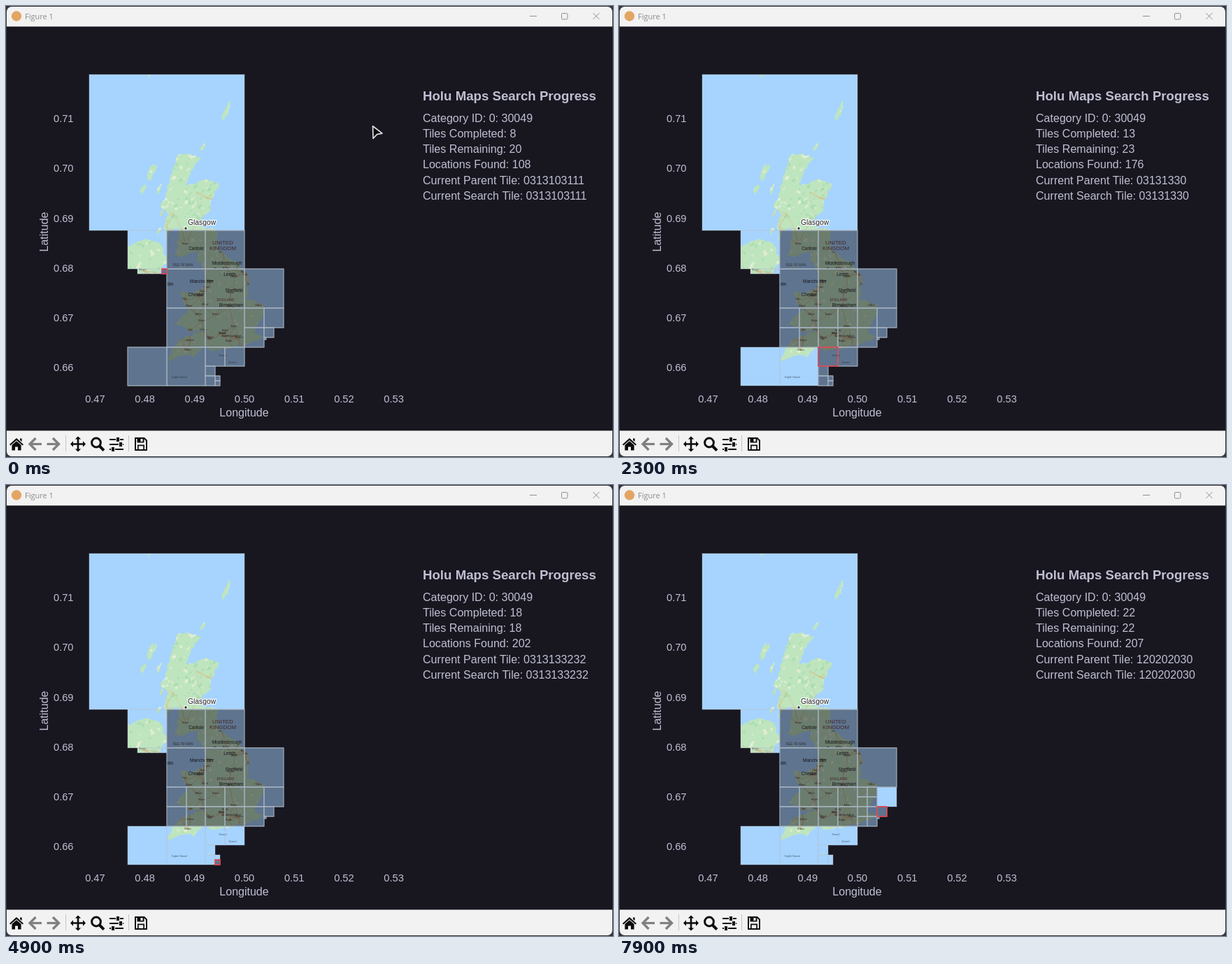
Recreate the animation shown at these times as an HTML page with a canvas. Size 868 by 645 pixels, loop 8000 ms.

```html
<!DOCTYPE html>
<html lang="en">
<head>
<meta charset="utf-8">
<title>Figure 1</title>
<style>
html, body { margin: 0; width: 100%; height: 100%; overflow: hidden; background: #181720; }
canvas { display: block; width: 868px; height: 645px; }
</style>
</head>
<body>
<canvas id="stage" width="868" height="645"></canvas>
<script>
const W = 868, H = 645, LOOP = 8000, UNIT = 7120;
const SANS = '"Liberation Sans", Arial, sans-serif';
const INK = '#bfbfd2', DARK = '#181720';
const stage = document.getElementById('stage').getContext('2d');

// Normalised Mercator square (0..1) to stage pixels
const px = u => 341 + (u - 0.5) * UNIT;
const py = v => 543.2 + (v - 0.34375) * UNIT;
const lonX = lon => px(0.5 + lon / 360);
const latY = lat =>
  py(0.5 - Math.log(Math.tan(Math.PI / 4 + lat * Math.PI / 360)) / (2 * Math.PI));

// Quadkey to pixel box [x, y, w, h], snapped to whole pixels
function tileBox(key) {
  let x = 0, y = 0;
  for (const d of key) { x = x * 2 + (d & 1); y = y * 2 + (d >> 1); }
  const n = 2 ** key.length;
  const l = Math.round(px(x / n)), t = Math.round(py(y / n));
  return [l, t, Math.round(px((x + 1) / n)) - l, Math.round(py((y + 1) / n)) - t];
}

function layer() {
  const c = document.createElement('canvas');
  c.width = W; c.height = H;
  return c;
}

function text(g, s, x, y, size, { color = INK, align = 'left', weight = '', font = SANS } = {}) {
  g.font = `${weight} ${size}px ${font}`;
  g.fillStyle = color;
  g.textAlign = align;
  g.fillText(s, x, y);
}

function line(g, color, width, ...pts) {
  g.strokeStyle = color;
  g.lineWidth = width;
  g.beginPath();
  for (let i = 0; i < pts.length; i += 2) g.lineTo(pts[i], pts[i + 1]);
  g.stroke();
}

function blob(g, x, y, rx, ry, turn) {
  g.beginPath();
  g.ellipse(x, y, rx, ry, turn, 0, 7);
  g.fill();
}

function random(seed) {
  return () => (seed = (seed * 16807) % 2147483647) / 2147483647;
}

// ---- Search ----
const visits = [
  [0, '0313103111'], [670, '0313130'], [1070, '0313131'], [1500, '0313132'],
  [1930, '0313123'], [2300, '03131330'], [2670, '03131331'], [3070, '031313320'],
  [4100, '031313322'], [4470, '0313133230'], [4900, '0313133232'], [5970, '12020200'],
  [6370, '12020201'], [6770, '12020202'], [7900, '120202030']
];
const later = ['0313110', '0313111', '0313112', '0313113', '1202002', '12020203200'];
const earlier = ['03113', '0313101', ...['010', '011', '100', '101', '110'].map(s => '0313103' + s)];
const crowded = new Set(['0313130', '0313131', '12020200', '12020202']);
const finds = { '0313132': 68, '03131330': 20, '031313320': 6, '12020201': 5 };

// A crowded tile splits into four, any other finished tile is cleared
function buildStates() {
  let open = [...visits.map(v => v[1]), ...later], found = 108;
  return visits.map(([start, key], i) => {
    if (i) {
      const last = visits[i - 1][1];
      open = open.filter(k => k !== last);
      if (crowded.has(last)) open.push(...[0, 1, 2, 3].map(d => last + d));
      found += finds[last] || 0;
    }
    return { start, key, found, done: 8 + i, open: [...open] };
  });
}

// ---- Map ----
const britain = [
  [-5, 58.6], [-3.1, 58.6], [-4.2, 57.55], [-1.8, 57.6], [-2.8, 56.4], [-3.4, 56.02],
  [-2, 55.8], [-1.2, 54.65], [-0.1, 54.1], [0.3, 53.1], [0.2, 52.85], [1.7, 52.7],
  [0.7, 51.5], [1.4, 51.2], [0, 50.78], [-3, 50.7], [-3.65, 50.25], [-5.6, 50.05],
  [-4.3, 51.2], [-2.8, 51.5], [-5.2, 51.75], [-4, 52.5], [-4.6, 53.2], [-3, 53.35],
  [-2.9, 54.1], [-3.5, 54.5], [-3.2, 54.95], [-5.1, 54.75], [-4.8, 55.9], [-5.7, 55.4],
  [-5.5, 56.4], [-6.1, 56.7], [-5.6, 57.5], [-5.2, 58.2]
];
const ireland = [[-9, 55], [-7.4, 55.35], [-6, 55.2], [-5.5, 54.5], [-6.2, 53.9], [-6.1, 53.4], [-9, 53.4]];
// lon, lat, radius in pixels
const islands = [
  [-6.2, 57.4, 5], [-6, 56.45, 4], [-6.2, 55.75, 4], [-6.7, 58.1, 8], [-7.3, 57.4, 6],
  [-1.3, 60.35, 8], [-3, 59, 5], [-6.9, 61.6, 3], [-4.55, 54.25, 3], [-2.55, 49.45, 1.5]
];
const small = ['Dale', 'Kirkton', 'Ashby', 'Norton', 'Weston', 'Milford'];
const labels = [
  ['Carlisle', 272, 348.5], ['Middlesbrough', 316, 369.8], ['Leeds', 320, 386],
  ['Manchester', 280, 396.4], ['Sheffield', 326, 409], ['Chester', 272, 415.4],
  ['Birmingham', 322, 429.6], ['Dublin', 230, 400]
];

function drawMap() {
  const c = layer(), g = c.getContext('2d'), rnd = random(77);
  const boxes = [...earlier, ...visits.map(v => v[1]), ...later].map(tileBox);
  const land = new Path2D(), covered = new Path2D();

  // Midpoint displacement roughens each stretch of coast
  function coast(a, b, depth) {
    if (!depth) return land.lineTo(...b);
    const dx = b[0] - a[0], dy = b[1] - a[1], k = (rnd() - 0.5) * 0.36;
    const mid = [(a[0] + b[0]) / 2 - dy * k, (a[1] + b[1]) / 2 + dx * k];
    coast(a, mid, depth - 1);
    coast(mid, b, depth - 1);
  }
  for (const shape of [britain, ireland]) {
    const pts = shape.map(([lon, lat]) => [lonX(lon), latY(lat)]);
    land.moveTo(...pts[0]);
    pts.forEach((p, i) => coast(p, pts[(i + 1) % pts.length], 4));
    land.closePath();
  }
  for (const [lon, lat, r] of islands) {
    for (let i = 0; i < 14; i++) {
      const a = i * Math.PI / 7, k = r * (0.45 + rnd() * 0.7);
      const dx = Math.cos(a) * k * 0.65, dy = Math.sin(a) * k * 1.6;
      land[i ? 'lineTo' : 'moveTo'](lonX(lon) + dx - dy * 0.35, latY(lat) + dy);
    }
    land.closePath();
  }

  boxes.forEach(b => covered.rect(...b));
  g.save();
  g.clip(covered);
  g.fillStyle = '#a6d4ff';
  g.fillRect(0, 0, W, H);
  g.save();
  g.fillStyle = '#bfe5be';
  g.fill(land);
  g.clip(land);
  for (let i = 0; i < 900; i++) {
    const x = 174 + rnd() * 205, y = 135 + rnd() * 380;
    const south = y > 322 && x > 229, remote = y < 215 || x < 240 && y < 300;
    g.fillStyle = rnd() < (remote ? 0.75 : 0.35) ? 'rgba(246,243,226,.6)'
      : south ? 'rgba(196,222,160,.5)' : 'rgba(152,217,168,.55)';
    blob(g, x, y, 0.6 + rnd() * 3, 0.6 + rnd() * 2, -0.8);
  }

  // Towns crowd the south; roads join each to its nearest neighbours
  const towns = Array.from({ length: 75 }, () => (
    { x: lonX(-8 + rnd() * 9.5), y: latY(50.3 + 7.5 * rnd() ** 1.4) }));
  for (const a of towns) {
    const gap = b => Math.hypot(b.x - a.x, b.y - a.y);
    const near = [...towns].sort((b, d) => gap(b) - gap(d)).slice(1, 4);
    const color = a.y < 322 ? 'rgba(226,170,110,.45)' : 'rgba(222,140,84,.75)';
    for (const b of near) {
      const mx = (a.x + b.x) / 2 + rnd() * 6 - 3, my = (a.y + b.y) / 2 + rnd() * 6 - 3;
      line(g, color, 0.6, a.x, a.y, mx, my, b.x, b.y);
    }
  }
  towns.forEach((t, i) => {
    if (t.y > 330) text(g, small[i % small.length], t.x, t.y, 3.2, { color: '#333', align: 'center' });
  });
  g.restore();

  const mark = { color: '#111', align: 'center' }, nation = { color: '#6a3636', align: 'center' };
  const sea = { color: '#456', align: 'center' };
  labels.forEach(([s, x, y]) => text(g, s, x, y, 6.5, mark));
  text(g, 'ISLE OF MAN', 253, 372, 4.6, { color: '#444', align: 'center' });
  text(g, 'UNITED', 310, 341, 8, nation);
  text(g, 'KINGDOM', 310, 349, 8, nation);
  text(g, 'ENGLAND', 314, 421.5, 5.2, nation);
  text(g, 'English Channel', 248, 532, 3, sea);
  text(g, 'Channel', 324, 511, 3, sea);
  text(g, 'Channel', 310, 501, 3, sea);
  // This name is cut off where two tiles meet
  g.save();
  g.beginPath();
  g.rect(290, 372, 50, 5);
  g.clip();
  text(g, 'Scarborough', 315, 379, 6.5, mark);
  g.restore();

  g.fillStyle = '#333';
  g.strokeStyle = 'rgba(255,255,255,.9)';
  g.lineJoin = 'round';
  g.lineWidth = 2.5;
  g.beginPath();
  g.arc(257, 318, 1.7, 0, 7);
  g.stroke();
  g.fill();
  g.font = '10.3px ' + SANS;
  g.textAlign = 'left';
  g.strokeText('Glasgow', 260, 312.5);
  text(g, 'Glasgow', 260, 312.5, 10.3, { color: '#222' });
  g.restore();

  g.strokeStyle = 'rgba(185,192,202,.4)';
  g.lineWidth = 1;
  boxes.forEach(b => g.strokeRect(...b));
  return c;
}

// ---- Window ----
function drawIcons(g) {
  const black = '#0c0c0c', grey = '#808080';
  const fill = (color, d) => { g.fillStyle = color; g.fill(new Path2D(d), 'evenodd'); };
  fill(black, 'M15 618L25 627L23.6 628.6L15 621L6.4 628.6L5 627ZM20 618.5H22.6V623L20 621Z' +
    'M8.4 628L15 622.3L21.6 628V635.5H17V630.5H13V635.5H8.4Z');
  for (const [x, s] of [[42, -1], [67.5, 1]]) {
    line(g, grey, 3.2, x - s * 9, 626.5, x + s * 7, 626.5);
    line(g, grey, 3.4, x - s * 0.5, 618, x + s * 8, 626.5, x - s * 0.5, 635);
  }
  for (const x of [85.5, 175.5]) line(g, '#c4c4c4', 1, x, 614, x, 637);

  g.save();
  g.translate(103, 626.5);
  for (let i = 0; i < 4; i++) {
    g.rotate(Math.PI / 2);
    fill(black, 'M-1.3 0V-7H-4.2L0 -11L4.2 -7H1.3V0Z');
  }
  g.restore();

  g.beginPath();
  g.arc(129, 624.5, 6.4, 0, 7);
  g.lineWidth = 3;
  g.strokeStyle = black;
  g.stroke();
  line(g, black, 4, 133.4, 629, 140, 635.6);

  [160, 164, 153].forEach((x, i) => {
    const y = 620 + i * 7;
    line(g, black, 2, 148, y, 168, y);
    g.fillStyle = '#f0f0f0';
    g.fillRect(x - 3, y - 3, 6, 6);
    g.fillStyle = black;
    g.fillRect(x - 2, y - 3, 4, 6);
  });

  fill(black, 'M184 617H198L202 621V636H184ZM186 619V634H200V622L197.5 619.2V624.5H187.5V619Z' +
    'M192.5 619H195.5V623H192.5ZM188 627.5H198V634H196.3V629.2H189.7V634H188Z');
}

function drawWindow() {
  const c = layer(), g = c.getContext('2d');
  g.fillStyle = '#34343e';
  g.fillRect(0, 0, W, H);
  g.save();
  g.beginPath();
  g.roundRect(1, 1, W - 2, H - 2, 7);
  g.clip();
  g.fillStyle = '#f2f2f2';
  g.fillRect(0, 0, W, H);
  g.fillStyle = DARK;
  g.fillRect(0, 29.4, W, 578);
  g.restore();

  g.fillStyle = '#e3a564';
  blob(g, 15, 14.5, 7.2, 7.2, 0);
  text(g, 'Figure 1', 27, 19, 11, { color: '#8b8b8b', font: '"Open Sans", sans-serif' });
  line(g, '#8f8f8f', 1, 749, 14.5, 759, 14.5);
  g.beginPath();
  g.roundRect(794.5, 10.5, 8.5, 8.5, 1.5);
  g.stroke();
  line(g, '#8f8f8f', 1, 839.5, 10, 848.5, 19);
  line(g, '#8f8f8f', 1, 848.5, 10, 839.5, 19);

  for (let v = 47; v <= 53; v++) {
    text(g, (v / 100).toFixed(2), px(v / 100), 567, 14.67, { align: 'center' });
  }
  for (let v = 66; v <= 71; v++) {
    text(g, (v / 100).toFixed(2), 96.5, py(1 - v / 100) + 5.6, 14.67, { align: 'right' });
  }
  text(g, 'Longitude', 340.5, 587, 16, { align: 'center' });
  g.save();
  g.translate(59.5, 323);
  g.rotate(-Math.PI / 2);
  text(g, 'Latitude', 0, 0, 16, { align: 'center' });
  g.restore();
  text(g, 'Holu Maps Search Progress', 596, 134.5, 18.67, { weight: 'bold' });
  drawIcons(g);
  g.drawImage(drawMap(), 0, 0);
  return c;
}

// ---- Animation ----
function drawTiles({ open, key }) {
  const boxes = open.map(tileBox);
  stage.fillStyle = 'rgba(24,23,32,.5)';
  boxes.forEach(b => stage.fillRect(...b));
  stage.strokeStyle = 'rgba(170,182,196,.75)';
  stage.lineWidth = 1.3;
  boxes.forEach(b => stage.strokeRect(...b));
  stage.strokeStyle = '#e5323c';
  stage.lineWidth = 1.4;
  stage.strokeRect(...tileBox(key));
}

function drawPointer(t) {
  if (t >= 100) return;
  const step = t < 30 ? 0 : t < 65 ? 0.4 : 1;
  const arrow = new Path2D(`M${524.5 + 324 * step} ${171.8 + 147 * step}l13.5 10.3l-7.5 1.6l-5.5 5.8z`);
  stage.lineJoin = 'round';
  stage.lineWidth = 1.7;
  stage.strokeStyle = '#e0e0e0';
  stage.fillStyle = '#0c0c10';
  stage.fill(arrow);
  stage.stroke(arrow);
}

const states = buildStates();
const backdrop = drawWindow();

function draw(t) {
  const s = states.findLast(v => v.start <= t);
  stage.drawImage(backdrop, 0, 0);
  drawTiles(s);
  [
    'Category ID: 0: 30049',
    'Tiles Completed: ' + s.done,
    'Tiles Remaining: ' + (s.open.length - 1),
    'Locations Found: ' + s.found,
    'Current Parent Tile: ' + s.key,
    'Current Search Tile: ' + s.key
  ].forEach((row, i) => text(stage, row, 596, 165.8 + i * 22.2, 16.07));
  drawPointer(t);
}

const begin = performance.now();
function tick() {
  draw((performance.now() - begin) % LOOP);
  requestAnimationFrame(tick);
}
tick();
</script>
</body>
</html>
```
